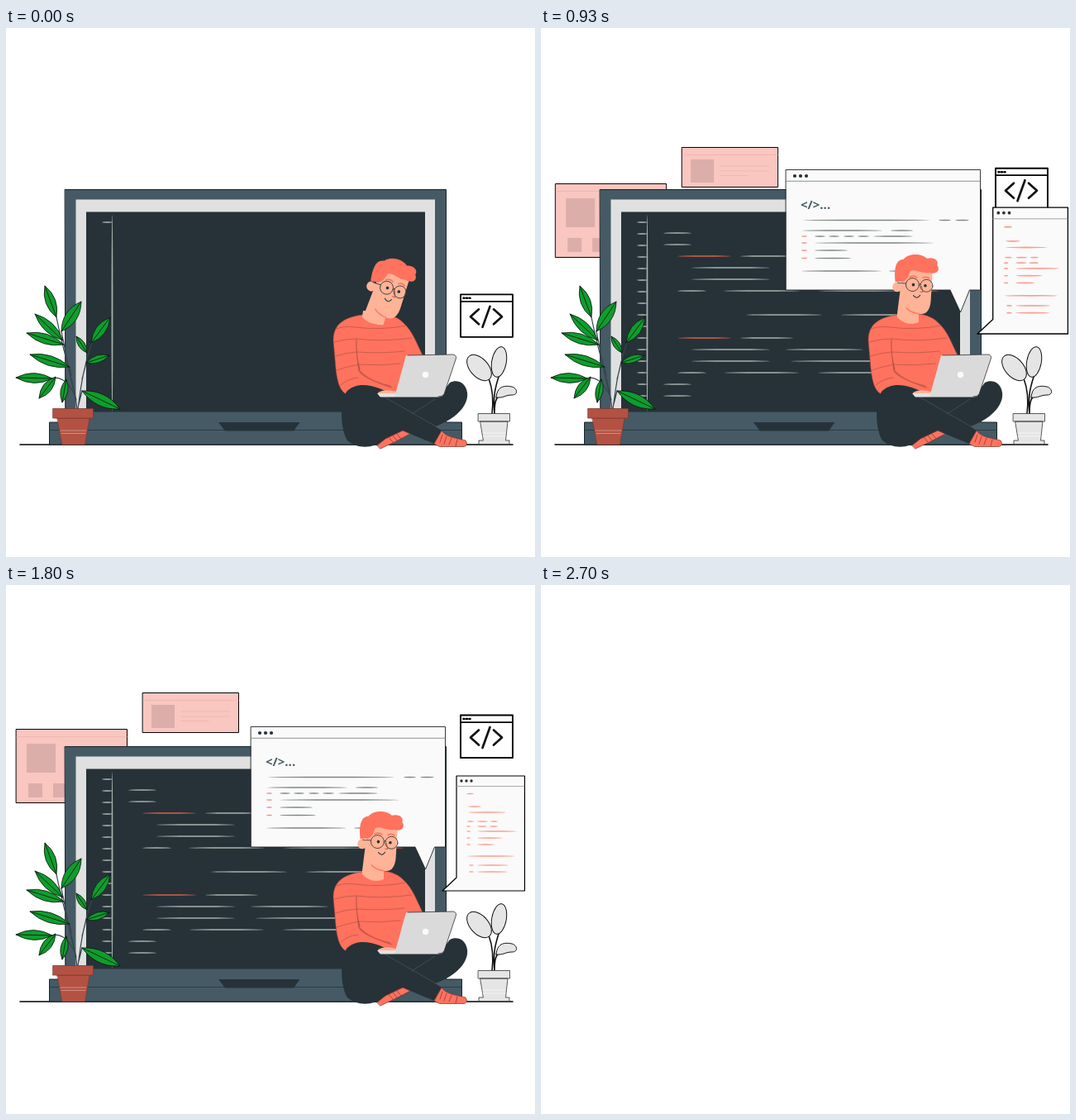
An HTML page for the animation above (2.73 s loop, 640 px wide and 640 px high).

```html
<!DOCTYPE html>
<html lang="en">
<head>
<meta charset="utf-8">
<title>Programmer at work</title>
<style>
  html, body { margin: 0; width: 100%; height: 100%; overflow: hidden; background: #fff; }
  svg { display: block; width: 100vw; height: 100vh; }
</style>
</head>
<body>
<svg viewBox="0 0 640 640" fill="none" stroke-linecap="round" stroke-linejoin="round">
  <g id="scene">
    <path d="M17 504H613" stroke="#000" stroke-width="1.6"/>

    <g id="cards" stroke="#000">
      <g fill="#f9c6c0">
        <rect x="12.5" y="174.5" width="134" height="89"/>
        <rect x="165.5" y="130.5" width="116" height="48"/>
      </g>
      <path d="M25 192h35v35h-35zM27 240h17v17h-17zM57 240h17v17h-17zM176 145h28v28h-28z" fill="#dbaeaa" stroke="none"/>
      <path d="M13 183.500H146M69 197H134M69 209H134M166 139.500H281M212 153H271M212 159H271M212 164.500H245" stroke="#eeb4ae" stroke-width=".8"/>
    </g>

    <g id="icon" stroke="#000">
      <rect x="550" y="322.500" width="63" height="51.500" fill="#fff" stroke-width="1.900"/>
      <path d="M550 331H613" stroke-width="1.800"/>
      <path d="M553.500 327h1m2.500 0h1m2.500 0h1" stroke-width="2.500"/>
      <path d="M572 340.500L562 349.500L572 358.500M585.500 337L576.500 362M590 340.500L600 349.500L590 358.500" stroke="#111" stroke-width="2.700"/>
    </g>

    <g id="computer">
      <path d="M71.500 195.500H532.500V477H551.500V504H52.500V477H71.500Z" fill="#455a64" stroke="#18242a"/>
      <path d="M84.500 207.500H519V465H84.500Z" fill="#e0e0e0"/>
      <path d="M97 222.500H507V465H97Z" fill="#263238"/>
      <path d="M72 464.500H532V478H72Z" fill="#455a64"/>
      <path d="M53 486.500H551" stroke="#2c3c44"/>
      <path d="M257 477H355.500L348 487.500H265Z" fill="#263238"/>
      <ellipse cx="128.500" cy="345" rx=".9" ry="119" fill="#a9b2ae"/>
    </g>
    <g id="ticks"></g>
    <g id="code"></g>

    <g id="bigWindow">
      <path d="M296.500 171.500H531.500V317H518.500L507.500 344L495 317H296.500Z" fill="#fafafa" stroke="#222" stroke-width=".9"/>
      <path d="M297 185.300H531" stroke="#8b9290"/>
      <path d="M307 179h.01m7 0h.01m7 0h.01" stroke="#263238" stroke-width="4.200"/>
      <text x="314" y="219" font-family="'Open Sans', sans-serif" font-size="15" font-weight="700" fill="#455a64">&lt;/&gt;...</text>
    </g>

    <g id="smallWindow">
      <path d="M545 231H627.500V370H528L545 354Z" fill="#fafafa" stroke="#000" stroke-width="1.200"/>
      <path d="M545 243.500H627" stroke="#999" stroke-width=".8"/>
      <path d="M551 237h.01m6 0h.01m6 0h.01" stroke="#263238" stroke-width="3.400"/>
    </g>

    <g id="leftPlant" stroke="#111">
      <path d="M86 461C82 425 72 405 61 350M85 450C76 420 74 400 67 367M87 461C91 430 94 410 104 380M97 405L92 425M77 410L79 420M56 424Q72 420 84 446M98 393L99 397M92 439L88 455" stroke="#34454d" stroke-width="1.200"/>
      <g id="leaves" fill="#0f9d2d" stroke-width=".8"></g>
      <path d="M62 472H101L95.500 504H68Z" fill="#b35243" stroke="#7b382e" stroke-width=".6"/>
      <path d="M57 460.500H105.500V472H57Z" fill="#b35243" stroke="#7b382e" stroke-width=".8"/>
      <path d="M66 487H97M67 490.500H96" stroke="#d58d80"/>
    </g>

    <g id="rightPlant" fill="#e5e5e5" stroke="#111">
      <path d="M588 467C590 450 589 437 584 424M591 467C589 445 592 435 596 422M591 467C591 455 592 448 597 445" fill="none" stroke-width="1.600"/>
      <ellipse cx="572.500" cy="411" rx="18.500" ry="11" transform="rotate(48 572.500 411)"/>
      <ellipse cx="596.500" cy="404" rx="18.500" ry="8.800" transform="rotate(-80 596.500 404)"/>
      <path d="M593 447C594 434 602 432 612 434C619 436 620 444 612 444C604 444 602 448 593 447Z"/>
      <path d="M574 476H607L604.500 499H609V503.500H572V499H577ZM571.500 466.500H609.500V476H571.500Z" stroke="#333" stroke-width=".8"/>
      <path d="M577 490H604M577 494H604" stroke="#f5f5f5"/>
    </g>

    <g id="person">
      <path d="M431 347C412 350 396 356 396 378L399 412C401 431 405 441 414 444H486L504 396C497 382 492 367 481 357C474 350 468 348 458 346Z" fill="#ff725e" stroke="#a64a3e" stroke-width=".6"/>
      <path d="M424.500 396L428 414Q440 427 464 432L468 436Q430 424 426 414Z" fill="#c75a4a"/>
      <path d="M399 364Q411 360 422 362Q455 366 484 360M397 380Q411 376 424 376Q455 380 491 375M398 397Q411 393 424 392Q455 394 482 391M400 414Q411 410 427 407Q452 409 477 406M405 432Q414 424 426 423" stroke="#9f4b40" stroke-width=".55"/>
      <path d="M424 377Q423 396 428 413" stroke="#9f4b40" stroke-width=".8"/>
      <path d="M432 342L431 350Q443 362 457 356V344Z" fill="#ffb397"/>
      <g id="head">
        <path d="M433 290L430 349Q442 360 456 354V344.500C465 346 469.500 339 469.500 328L469 290Z" fill="#ffb397"/>
        <circle cx="428" cy="314" r="6" fill="#ffb397"/>
        <path d="M441 339Q447 344 456 344.500" stroke="#ff7c68" stroke-width="1.500"/>
        <path d="M425 308C422 291 424 281 433 280C440 271 455 272 461 277C470 274 476 279 474 284C479 290 474 296 465 294C455 296 447 290 442 294C440 301 439 305 434 307Z" fill="#ff725e"/>
        <path d="M442 301Q447 298 451 301M458 301Q462 298 466 301" stroke="#ff725e" stroke-width="1.500"/>
        <path d="M428 309H438M454 309Q455 307 456 309" stroke="#333" stroke-width=".8"/>
        <path d="M457 311L459 318H456" stroke="#b85b4b" stroke-width=".9"/>
        <path d="M448 323Q453 328 456 322" stroke="#263238" stroke-width="1.100"/>
        <g stroke="#45413f" stroke-width=".9">
          <circle cx="446" cy="310" r="8"/><circle cx="463" cy="310" r="7.500"/>
        </g>
        <path id="eyes" d="M447 310h.01M461.500 310h.01" stroke="#263238" stroke-width="3.600"/>
        <path id="lids" d="M444 310Q447 313 450 310M459 310Q462 313 465 310" stroke="#263238"/>
      </g>
      <path d="M412 440C404 452 404 485 413 499C425 510 445 508 456 500L482 488L518 503L527 487L519 482C545 473 560 456 558 441C556 428 545 425 537 429L524 446H470C450 432 425 426 412 440Z" fill="#263238"/>
      <path d="M457 446L520 482M519 449L491 467" stroke="#46545b" stroke-width=".8"/>
      <g fill="#ff725e" stroke="#7b342b" stroke-width=".7">
        <path d="M449 505L459 497L480 487L489 491L472 500L453 509Z"/>
        <path d="M518 503L527 487C532 495 545 496 556 499Q560 505 554 506.500H525Z"/>
        <path d="M463 495l5 6m0-8l5 6m0-8l5 6M528 492l-3 9m8-7l-3 9m9-7l-3 8m10-6l-2 8"/>
      </g>
      <path d="M450 441Q458 436 472 440V446H452Z" fill="#ffb397"/>
      <path d="M449 442H474L470 446.500H453Z" fill="#e3e3e3"/>
      <path d="M484 396L541 395Q546 396 544 401L530 443Q528 446.500 523 446.500H470Z" fill="#dadada"/>
      <path d="M486 396L541 395Q546 396 544 401L530 443Q528 446 523 446" stroke="#333" stroke-width=".8"/>
      <circle cx="507.500" cy="419.500" r="3.700" fill="#fafafa"/>
    </g>
  </g>
</svg>

<script>
const LOOP = 2730, STEP = 30;
const $ = id => document.getElementById(id);
const clamp = x => Math.max(0, Math.min(1, x));
const add = (id, markup) => $(id).insertAdjacentHTML('beforeend', markup);

// Tapered strokes, one row per "y: from-to ..."; "r" marks a coral stroke.
function addLines(id, rows, gray, red, half) {
  for (const row of rows.split('|')) {
    const [y, spans] = row.trim().split(':');
    for (const span of spans.trim().split(' ')) {
      const [a, b] = span.replace('r', '').split('-').map(Number);
      add(id, `<ellipse cx="${(a + b) / 2}" cy="${y}" rx="${(b - a) / 2}" ry="${half}" fill="${span[0] === 'r' ? red : gray}"/>`);
    }
  }
}

addLines('code', `248:148-182|262:148-182|276:r165-230 241-307|290:182-277 298-392
  |304:182-277 302-440|318:165-200 221-313 336-435 r448-481|347:248-340 363-461
  |375:r165-230 241-305|389:182-277 296-390|403:182-277 302-439
  |417:165-200 222-312 335-428|431:148-182|445:148-182`, '#aab3b0', '#d9604f', .85);
addLines('bigWindow', `232.500:317-470 481-496 501-518|245:316-413 423-450
  |252:r315-322 331-344 348-361 366-379 383-397 402-450|260:r315-322 331-475
  |269:r315-322 331-371|278.500:r315-322 331-375|294:315-412 421-448`, '#7d8583', '#f58d81', .8);
addLines('smallWindow', `252.500:557-566|268:559-575|275:559-605|286:558-566 570-583 586-595
  |292:557-562 570-582 585-595|298:557-562 570-618|306:557-562 570-600|314:557-562 570-591
  |328:558-616|339:560-566 570-608|347:560-566 570-607`, '#ff9c8f', '#ff9c8f', .8);

for (let i = 0; i < 16; i++)
  add('ticks', `<ellipse cx="122.500" cy="${235 + i * 14}" rx="6.500" ry=".8" fill="#b4bdba"/>`);

function addLeaf(x, y, tipX, tipY, width = 12) {
  const mx = (x + tipX) / 2, my = (y + tipY) / 2;
  const k = width / Math.hypot(tipX - x, tipY - y);
  const nx = (y - tipY) * k, ny = (tipX - x) * k;
  add('leaves', `<path d="M${x} ${y}Q${mx + nx} ${my + ny} ${tipX} ${tipY}Q${mx - nx} ${my - ny} ${x} ${y}L${tipX} ${tipY}"/>`);
}
[[61, 350, 47, 312], [67, 367, 91, 331, 14], [69, 378, 35, 346], [70, 383, 25, 369],
 [77, 410, 29, 395], [103, 381, 126, 350], [98, 393, 85, 373, 8], [97, 405, 125, 396, 9],
 [56, 424, 12, 423], [60, 422, 40, 448, 11], [73, 425, 68, 453, 9], [92, 439, 138, 461, 14]
].forEach(leaf => addLeaf(...leaf));
const ticks = [...$('ticks').children];

const smooth = x => x * x * (3 - 2 * x);
const backOut = u => 1 + 2.8 * (u - 1) ** 3 + 1.8 * (u - 1) ** 2;
const rise = t => t < 646 ? .5 * 2 ** ((t - 646) / 72) : 1 - .5 * 2 ** ((646 - t) / 103);
const show = (id, on) => $(id).setAttribute('visibility', on ? 'visible' : 'hidden');
const move = (id, transform) => $(id).setAttribute('transform', transform);

function pop(id, x, y, u) {
  show(id, u > 0);
  move(id, `translate(${x} ${y}) scale(${backOut(clamp(u))}) translate(${-x} ${-y})`);
}

function draw(t) {
  $('scene').style.display = t < 2700 ? '' : 'none';

  const left = 1 - rise(t), fade = 1 - clamp((t - 1950) / 300);
  move('cards', `translate(${70 * left} ${189 * left})`);
  move('icon', `translate(0 ${165 * left - 165})`);
  $('cards').setAttribute('opacity', fade);
  $('icon').setAttribute('opacity', fade);

  ticks.forEach((tick, i) => tick.setAttribute('visibility', t >= i * 50 ? 'visible' : 'hidden'));
  const typed = smooth(clamp((t - 400) / 530));
  show('code', typed > 0);
  move('code', `translate(148 0) scale(${typed} 1) translate(-148 0)`);

  pop('bigWindow', 513, 350, t / 600);
  pop('smallWindow', 528, 370, (t - 660) / 540);

  move('head', `rotate(${9 + 9 * Math.cos(t / LOOP * 2 * Math.PI)} 440 358)`);
  const blink = t >= 600 && t < 720;
  show('eyes', !blink);
  show('lids', blink);
}

const start = performance.now();
function tick() {
  const t = (performance.now() - start) % LOOP;
  draw(Math.floor(t / STEP) * STEP);
  requestAnimationFrame(tick);
}
tick();
</script>
</body>
</html>
```
